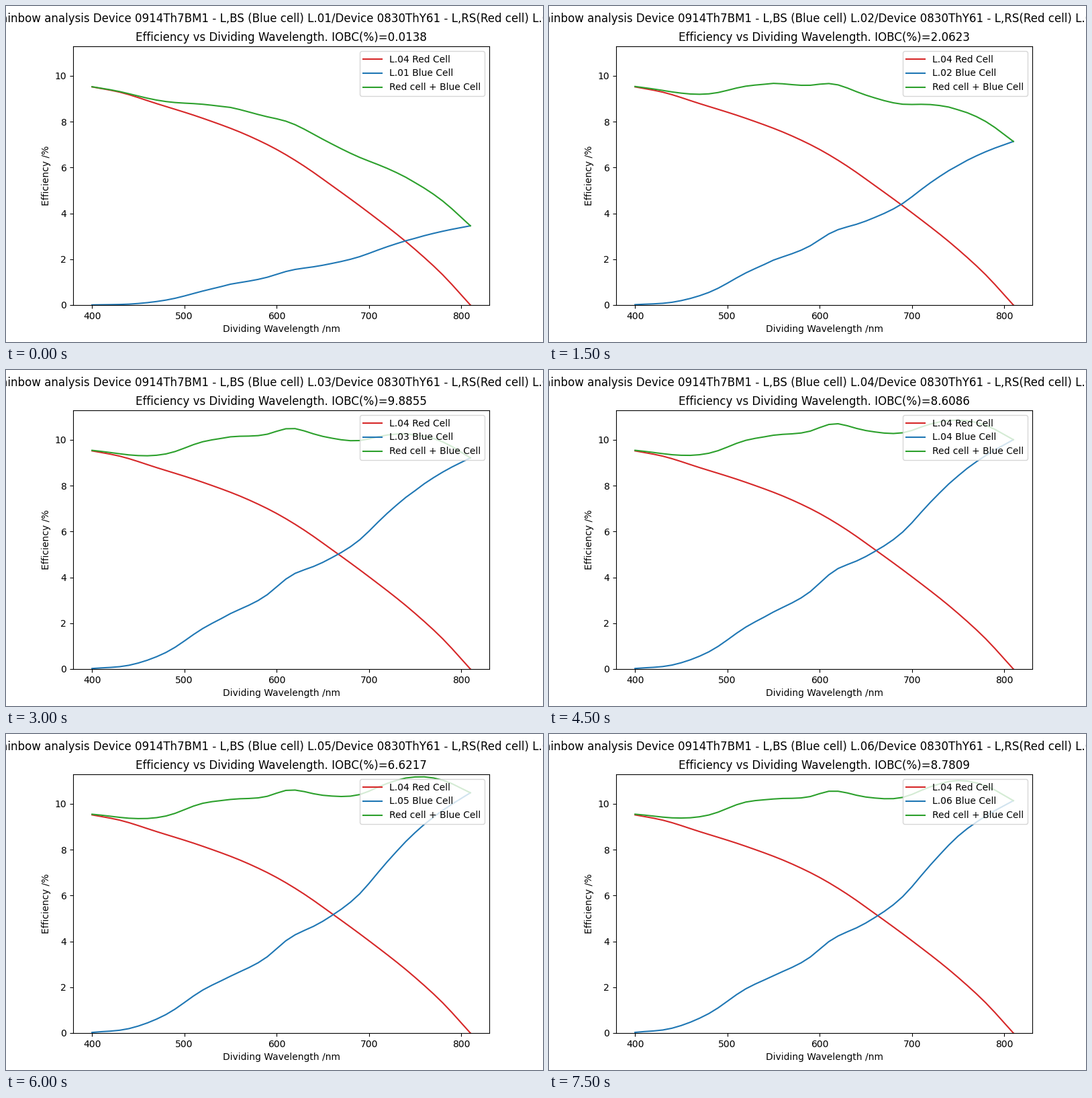
A matplotlib script that plays this animation: 800 px wide and 500 px high, repeating every 8 s.

```python
import numpy as np
import matplotlib.pyplot as plt
from matplotlib.animation import FuncAnimation

STEP_MS = 500
STEPS = 16            # 8 s loop
STEPS_PER_CELL = 3    # each blue cell stays for 1.5 s

plt.rcParams["font.family"] = "DejaVu Sans"
plt.rcParams["text.hinting_factor"] = 32   # finer letter spacing

wl = np.arange(400, 811, 10)


def smooth(*points):
    """Cubic Hermite curve through a few (wavelength, value) points."""
    x, y = np.array(points, float).T
    slope = np.gradient(y, x)
    k = np.clip(np.searchsorted(x, wl, side="right") - 1, 0, len(x) - 2)
    h = x[k + 1] - x[k]
    t = (wl - x[k]) / h
    ease = t * t * (3 - 2 * t)
    return (y[k] * (1 - ease) + y[k + 1] * ease
            + h * t * (1 - t) * (slope[k] * (1 - t) - slope[k + 1] * t))


red = smooth((400, 9.52), (430, 9.29), (470, 8.79), (520, 8.15), (570, 7.38),
             (600, 6.79), (630, 6.06), (660, 5.21), (700, 4.03), (750, 2.43),
             (780, 1.32), (810, 0))

# Response shape common to all blue cells.
blue = smooth((400, 0.03), (440, 0.21), (480, 0.85), (520, 1.93), (550, 2.50),
              (590, 3.32), (610, 3.99), (650, 4.80), (690, 5.95), (720, 7.33),
              (750, 8.59), (780, 9.47), (810, 10.14))

# Each cell: IOBC and its gain over the common shape at the gain knots.
gain_knots = (440, 550, 620, 700, 750, 810)
cells = [
    (0.0138, (.19, .364, .367, .353, .339, .341)),
    (2.0623, (.57, .784, .777, .740, .709, .704)),
    (9.8855, (.78, .968, .986, .942, .906, .909)),
    (8.6086, (.82, .996, 1.036, 1.0, .981, .987)),
    (6.6217, (.92, .992, 1.012, 1.022, 1.018, 1.034)),
    (8.7809, (1, 1, 1, 1, 1, 1)),
]

fig, ax = plt.subplots(figsize=(8, 5), dpi=100)
heading = fig.suptitle(" ")
title = ax.set_title(" ")
ax.plot(wl, red, color="tab:red", label="L.04 Red Cell")
blue_line, = ax.plot(wl, blue, color="tab:blue", label="L.01 Blue Cell")
sum_line, = ax.plot(wl, red + blue, color="tab:green",
                    label="Red cell + Blue Cell")
ax.set_xlim(379.5, 830.5)
ax.set_ylim(0, 11.29)
ax.set_xlabel("Dividing Wavelength /nm")
ax.set_ylabel("Efficiency /%")
legend = ax.legend(loc="upper right")


def update(step):
    i = step // STEPS_PER_CELL
    iobc, gains = cells[i]
    name = f"L.{i + 1:02d}"
    curve = blue * np.interp(wl, gain_knots, gains)
    blue_line.set_ydata(curve)
    sum_line.set_ydata(red + curve)
    legend.get_texts()[1].set_text(f"{name} Blue Cell")
    title.set_text(f"Efficiency vs Dividing Wavelength. IOBC(%)={iobc:.4f}")
    heading.set_text(f"Rainbow analysis Device 0914Th7BM1 - L,BS (Blue cell) "
                     f"{name}/Device 0830ThY61 - L,RS(Red cell) L.04")
    return blue_line, sum_line, title, heading


anim = FuncAnimation(fig, update, frames=STEPS, interval=STEP_MS,
                     init_func=lambda: update(0), repeat=True, repeat_delay=0)
plt.show()
```
